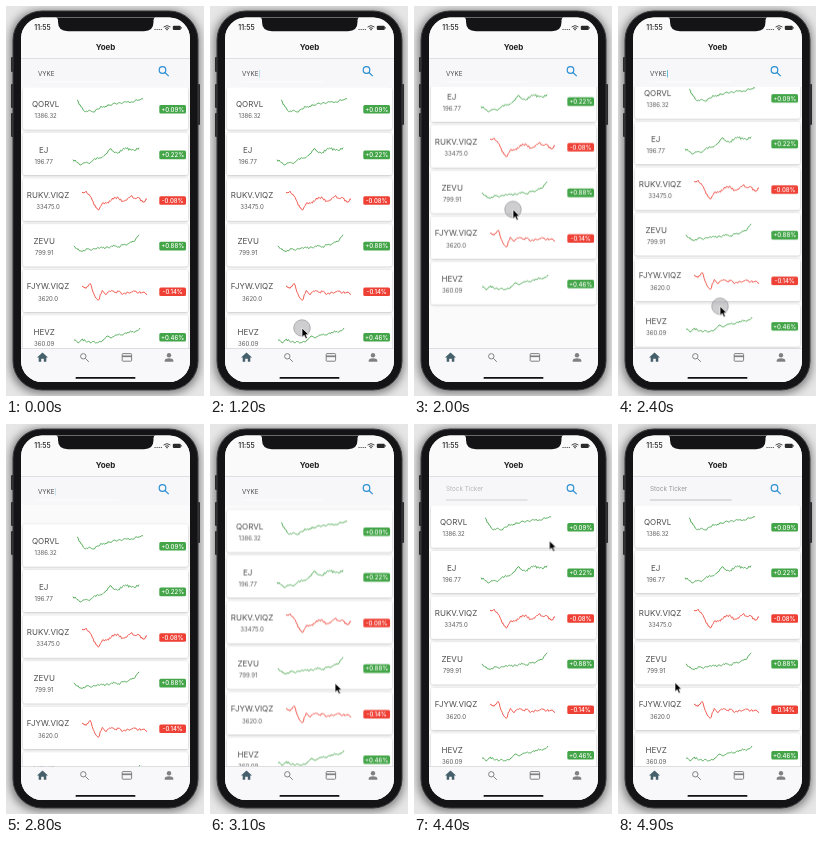
Recreate the animation shown at these times as an HTML page. Size 198 px wide and 390 px high, loop 5000 ms.

```html
<!DOCTYPE html>
<html lang="en">
<head>
<meta charset="utf-8">
<title>Stock list</title>
<style>
html, body { margin: 0; width: 100%; height: 100%; overflow: hidden; background: #e6e6e6; }
svg { display: block; width: 100%; height: 100%; }
text { font-family: Inter, Roboto, sans-serif; }
.mid { text-anchor: middle; }
.name { font-size: 8px; fill: #4c4c4e; }
.price { font-size: 6px; fill: #5c5c5e; }
.pct { font-size: 6px; font-weight: 500; fill: #fff; }
.line { fill: none; stroke-width: .85; stroke-linejoin: round; }
.up { --tone: #43a548; }
.down { --tone: #ee4035; }
.line { stroke: var(--tone); }
.badge { fill: var(--tone); }

#list, #cursor, #press, #typed, #empty { animation: 5s linear infinite; }
#list { animation-name: scroll; }
#cursor { animation-name: move; }
#press { animation-name: press; }
#typed { animation-name: typed; }
#empty { animation-name: empty; }
#caret { animation: blink 1s linear infinite; }

@keyframes scroll {
  0%, 24.5% { transform: translateY(0); }
  26% { transform: translateY(-2px); }
  32% { transform: translateY(-25px); }
  36% { transform: translateY(-43px); }
  40%, 42% { transform: translateY(-53.3px); }
  48% { transform: translateY(-11px); }
  52% { transform: translateY(7px); }
  56%, 58% { transform: translateY(19px); }
  60% { transform: translateY(10px); }
  62% { transform: translateY(4.5px); }
  64% { transform: translateY(1.5px); }
  67%, 100% { transform: translateY(0); }
}
@keyframes move {
  0%, 11% { transform: translate(210px, 371px); }
  12% { transform: translate(191px, 370px); }
  14% { transform: translate(172px, 371px); }
  18% { transform: translate(122px, 350px); }
  22% { transform: translate(94px, 326px); }
  24% { transform: translate(92px, 322px); }
  26% { transform: translate(92px, 317px); }
  32% { transform: translate(94px, 262.5px); }
  36% { transform: translate(97px, 222px); }
  40%, 42% { transform: translate(99px, 203.5px); }
  48% { transform: translate(102px, 300px); }
  52% { transform: translate(104px, 360px); }
  56%, 58% { transform: translate(106px, 404px); }
  60% { transform: translate(112px, 342px); }
  62% { transform: translate(125px, 260px); }
  66% { transform: translate(150px, 110px); }
  70% { transform: translate(164px, 44px); }
  72% { transform: translate(170px, 60px); }
  74% { transform: translate(168px, 65px); }
  76%, 82% { transform: translate(160px, 66px); }
  85% { transform: translate(162px, 66px); }
  90% { transform: translate(118px, 150px); }
  95% { transform: translate(66px, 244px); }
  98%, 100% { transform: translate(57px, 258.5px); }
}
@keyframes press {
  0%, 23.4% { opacity: 0; }
  23.5%, 57.5% { opacity: 1; }
  57.6%, 75.4% { opacity: 0; }
  75.5%, 85% { opacity: 1; }
  85.1%, 100% { opacity: 0; }
}
@keyframes typed {
  0%, 86% { opacity: 1; }
  86.1%, 100% { opacity: 0; }
}
@keyframes empty {
  0%, 86% { opacity: 0; }
  89%, 99.9% { opacity: 1; }
  100% { opacity: 0; }
}
@keyframes blink {
  0%, 12% { opacity: 0; }
  30%, 65% { opacity: 1; }
  88%, 100% { opacity: 0; }
}
</style>
</head>
<body>
<svg viewBox="0 0 198 390" preserveAspectRatio="none">
  <defs>
    <filter id="soft" x="-20%" y="-20%" width="140%" height="140%"><feGaussianBlur stdDeviation="5"/></filter>
    <filter id="lift" x="-5%" y="-10%" width="110%" height="125%">
      <feDropShadow dx="0" dy=".6" stdDeviation=".8" flood-color="#000" flood-opacity=".26"/>
    </filter>
    <clipPath id="screen"><rect x="15" y="11.5" width="169" height="364.5" rx="21"/></clipPath>
    <clipPath id="view"><rect x="15" y="81" width="169" height="261.5"/></clipPath>
  </defs>

  <rect x="5" y="5" width="188" height="382" rx="28" opacity=".5" filter="url(#soft)"/>
  <g fill="#2a2a2c">
    <rect x="5" y="51" width="4" height="15" rx="1"/>
    <rect x="5" y="78" width="4" height="24" rx="1"/>
    <rect x="5" y="107" width="4" height="24" rx="1"/>
    <rect x="190" y="78" width="4" height="41" rx="1"/>
  </g>
  <rect x="7" y="5" width="185" height="379" rx="29" fill="#141416" stroke="#3c3c3f"/>

  <g clip-path="url(#screen)">
    <rect x="15" y="11" width="169" height="366" fill="#fafafb"/>
    <g clip-path="url(#view)"><g id="list"></g></g>

    <rect x="15" y="52" width="169" height="29" fill="#f7f7f9"/>
    <rect x="15" y="11" width="169" height="41" fill="#fafafb"/>
    <path d="M15 52.5H184" stroke="#d6d6d8" stroke-width=".7"/>
    <text class="mid" x="99.5" y="44.2" font-size="8" font-weight="700" fill="#222">Yoeb</text>

    <g id="typed">
      <text x="32" y="70.4" font-size="6.3" fill="#4c4c4e">VYKE</text>
      <path d="M32 76H113" stroke="#fff" stroke-width=".8"/>
      <rect id="caret" x="49" y="64" width=".8" height="7.5" fill="#45aecb"/>
    </g>
    <g id="empty">
      <text x="32" y="67.2" font-size="6.3" fill="#969698">Stock Ticker</text>
      <path d="M32 76H113.5" stroke="#a9a9ab" stroke-width=".7"/>
    </g>
    <g fill="none" stroke="#2b8fd2" stroke-width="1.2">
      <circle cx="156.5" cy="64" r="3.3"/><path d="M159 66.5L162.7 70.2"/>
    </g>

    <rect x="15" y="342.5" width="169" height="35" fill="#f8f8fa"/>
    <path d="M15 342.5H184" stroke="#d3d3d6" stroke-width=".7"/>
    <path d="M36.5 346.5L31 351.6H32.7V355.8H35.2V352.8H37.8V355.8H40.3V351.6H42Z" fill="#455f6b"/>
    <g fill="none" stroke="#808083" stroke-width="1">
      <circle cx="77.3" cy="350.3" r="2.7"/><path d="M79.4 352.4L82.8 355.8"/>
      <rect x="116.2" y="347.6" width="9.4" height="7.6" rx=".8"/><path d="M116 350.3H126" stroke-width="1.7"/>
    </g>
    <g fill="#808083">
      <circle cx="163" cy="349.2" r="2.2"/><path d="M158.700 355.700V354.500C158.700 351.600 167.300 351.600 167.300 354.500V355.700Z"/>
    </g>
    <rect x="69.5" y="371" width="60" height="1.8" rx=".9" fill="#111"/>

    <path d="M48 10H151Q147.500 11.500 147.500 14V16Q147.500 25.200 138 25.200H62Q52 25.200 52 16V14Q52 11.500 48 10Z" fill="#141416"/>
    <text class="mid" x="36.5" y="24.3" font-size="6.9" font-weight="600" fill="#333">11:55</text>
    <path d="M148.500 23.500H156" stroke="#444" stroke-width="1" stroke-dasharray="1.100 1"/>
    <g fill="none" stroke="#333" stroke-width=".9">
      <path d="M157.600 21Q161 18.200 164.400 21"/><path d="M159 22.500Q161 20.800 163 22.500"/>
    </g>
    <circle cx="161" cy="23.6" r=".8" fill="#333"/>
    <rect x="166.8" y="19.7" width="8" height="4.300" rx="1.1" fill="#2a2a2a"/>
    <rect x="175.2" y="21" width=".8" height="1.6" fill="#555"/>
  </g>

  <g id="cursor">
    <circle id="press" r="8.3" fill="#98989f" fill-opacity=".48" stroke="#66666c" stroke-opacity=".6" stroke-width=".7"/>
    <path d="M0 0V9.300L2.200 7.300L3.800 10.800L5.400 10L3.900 6.700H6.800Z" fill="#000" stroke="#fff" stroke-width=".7"/>
  </g>
</svg>
<script>
const PITCH = 45.6, FIRST = 98;
const rows = [
  ["QORVL", "1386.32", "+0.09%", 71, 137, [-4, 3, 8, 6, 8, 5, 3, 2, 1, -1, -1, -1, -2, -2, -3, -4, -5]],
  ["EJ", "196.77", "+0.22%", 67, 133, [10, 13, 15, 13, 14, 10, 8, 8, 4, -1, 3, 3, 0, -1, 0, 1, -2]],
  ["RUKV.VIQZ", "33475.0", "-0.08%", 76, 141, [-3, -4, 1, 10, 15, 8, 8, 6, 2, 3, 6, 5, 1, 3, 3, 7, 4]],
  ["ZEVU", "799.91", "+0.88%", 68, 133, [5, 8, 11, 8, 9, 8, 7, 7, 6, 6, 5, 6, 4, 4, 1, 0, -6]],
  ["FJYW.VIQZ", "3620.0", "-0.14%", 76, 141, [0, 2, -3, 8, 14, 4, 8, 5, 6, 5, 8, 6, 6, 5, 6, 6, 8]],
  ["HEVZ", "360.09", "+0.46%", 68, 134, [8, 11, 7, 10, 11, 10, 10, 8, 4, 6, 3, 2, 2, 0, 0, -1, -4]]
];

let seed = 7;
const random = () => (seed = seed * 16807 % 2147483647) / 2147483647;

// Joins the levels with small seeded wiggles
function chart(x0, x1, levels, y) {
  const parts = 4, count = (levels.length - 1) * parts;
  const points = [];
  for (let i = 0; i <= count; i++) {
    const k = Math.floor(i / parts), t = i % parts / parts;
    const next = levels[Math.min(k + 1, levels.length - 1)];
    const level = levels[k] + (next - levels[k]) * t;
    const wiggle = t ? (random() - .5) * 2.4 : 0;
    points.push((x0 + (x1 - x0) * i / count).toFixed(1) + "," + (y + level + wiggle).toFixed(1));
  }
  return points.join(" ");
}

function row([name, price, pct, x0, x1, levels], i) {
  const y = FIRST + i * PITCH, cx = 38.2 + (x0 - 68) * .48;
  return `<g class="${pct[0] === "+" ? "up" : "down"}">
    <rect x="17" y="${y - 16.5}" width="165" height="42" rx="2.5" fill="#fff" filter="url(#lift)"/>
    <text class="mid name" x="${cx}" y="${y + 2.9}">${name}</text>
    <text class="mid price" x="${cx}" y="${y + 14.2}">${price}</text>
    <polyline class="line" points="${chart(x0, x1, levels, y)}"/>
    <rect class="badge" x="153.3" y="${y + 1}" width="26.7" height="8.6" rx="1.5"/>
    <text class="mid pct" x="166.7" y="${y + 7.5}">${pct}</text>
  </g>`;
}

document.getElementById("list").innerHTML = rows.map(row).join("");
</script>
</body>
</html>
```
